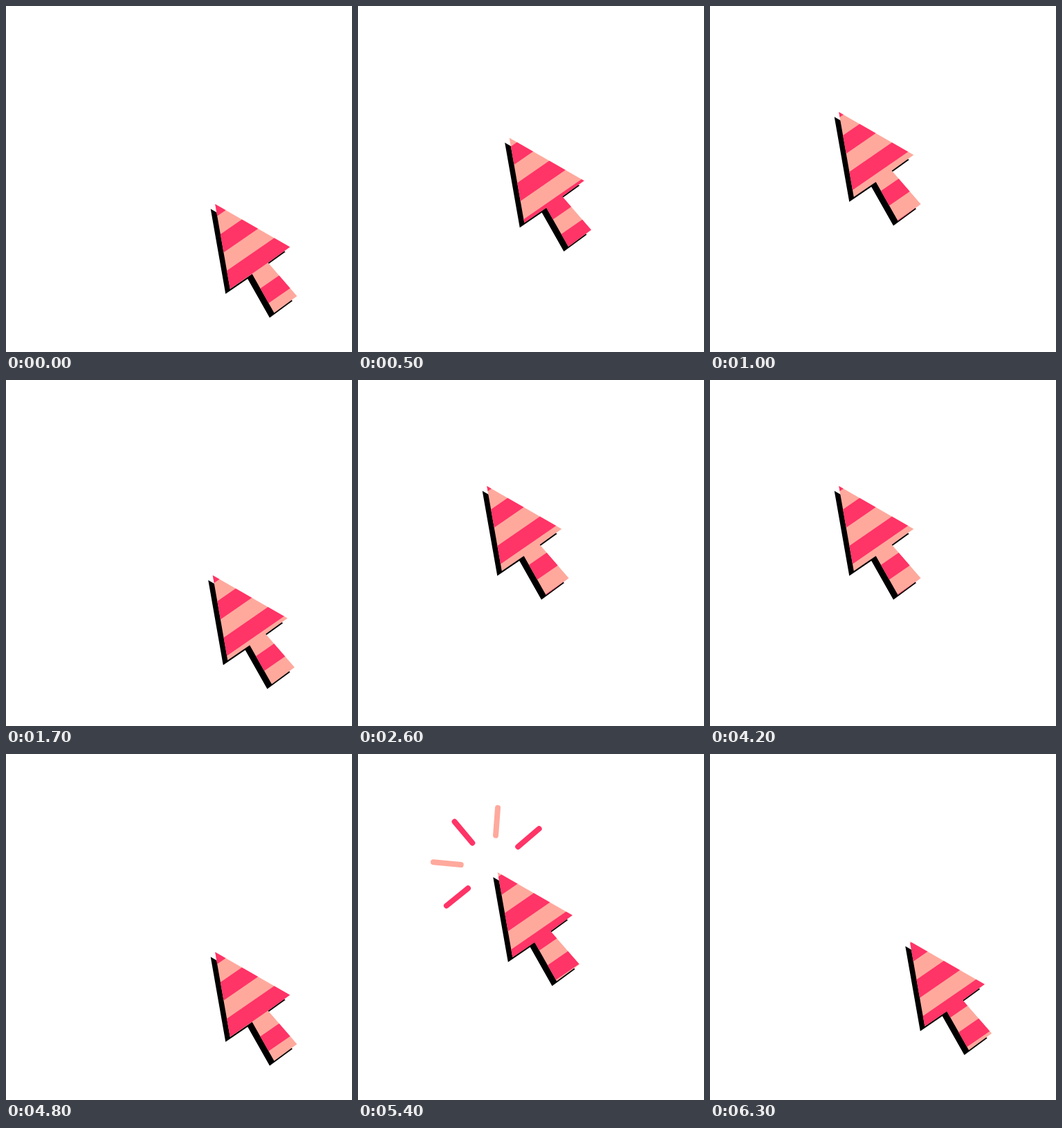
Recreate the animation shown at these times as an HTML page with a canvas. Size 500 px wide and 500 px high, loop 6400 ms.

```html
<!DOCTYPE html>
<html lang="en">
<head>
<meta charset="utf-8">
<title>Striped cursor</title>
<style>
  html, body { margin: 0; width: 100%; height: 100%; overflow: hidden; background: #fff; }
  canvas { display: block; width: 500px; height: 500px; }
</style>
</head>
<body>
<canvas id="stage" width="500" height="500"></canvas>
<script>
const ctx = document.getElementById('stage').getContext('2d');

const HOT = '#ff3467';
const LIGHT = '#ffa99d';
const STEP_MS = 100;

// Share of the way from REST to CLICK at each step of one click cycle.
const travel = [0, .03, .116, .241, .48, .72, .866, .955, .99, 1, 1, .775, .56, .39, .241, .116];
const REST = { x: 302.5, y: 286.5 };
const CLICK = { x: 186.5, y: 153.5 };

const arrow = new Path2D(
  'M-0.3 -0.3 L107.8 61.8 L76.2 84.6 L118 132.8 L85 157 L53.2 100.8 L21.3 122.5 Z');

const STRIPE = { period: 59, slope: 0.69, start: 48.5, speed: 7 };

const BURST = { x: 195.5, y: 164.5, inner: 47, length: 40, first: 6 };
const burstOffsets = [0, 8, 24];
const rays = [
  { angle: 141, color: HOT },
  { angle: 185.5, color: LIGHT },
  { angle: 230, color: HOT },
  { angle: 274.3, color: LIGHT },
  { angle: 319.5, color: HOT }
];

function drawStripes(step) {
  const { period, slope, start, speed } = STRIPE;
  const left = -10, right = 130;
  const phase = start - speed * step;
  ctx.fillStyle = HOT;
  for (let i = -2; i < 7; i++) {
    const top = phase + i * period;
    const bottom = top + period / 2;
    ctx.beginPath();
    ctx.moveTo(left, top - slope * left);
    ctx.lineTo(right, top - slope * right);
    ctx.lineTo(right, bottom - slope * right);
    ctx.lineTo(left, bottom - slope * left);
    ctx.fill();
  }
}

function drawArrow(step) {
  const p = travel[step];
  ctx.save();
  ctx.translate(REST.x + (CLICK.x - REST.x) * p, REST.y + (CLICK.y - REST.y) * p);

  ctx.save();
  ctx.translate(-6.5, 7);
  ctx.fillStyle = '#000';
  ctx.fill(arrow);
  ctx.restore();

  ctx.fillStyle = LIGHT;
  ctx.fill(arrow);
  ctx.clip(arrow);
  drawStripes(step);
  ctx.restore();
}

function drawBurst(step) {
  const offset = burstOffsets[step - BURST.first];
  if (offset === undefined) return;
  const near = BURST.inner + offset;
  const far = near + BURST.length;
  ctx.lineWidth = 8;
  ctx.lineCap = 'round';
  for (const { angle, color } of rays) {
    const a = angle * Math.PI / 180;
    ctx.strokeStyle = color;
    ctx.beginPath();
    ctx.moveTo(BURST.x + near * Math.cos(a), BURST.y + near * Math.sin(a));
    ctx.lineTo(BURST.x + far * Math.cos(a), BURST.y + far * Math.sin(a));
    ctx.stroke();
  }
}

function render(ms) {
  const step = Math.floor(ms / STEP_MS) % travel.length;
  ctx.fillStyle = '#fff';
  ctx.fillRect(0, 0, 500, 500);
  drawBurst(step);
  drawArrow(step);
}

let startTime;
function tick(now) {
  startTime ??= now;
  render(Math.max(0, now - startTime));
  requestAnimationFrame(tick);
}
render(0);
requestAnimationFrame(tick);
</script>
</body>
</html>
```
